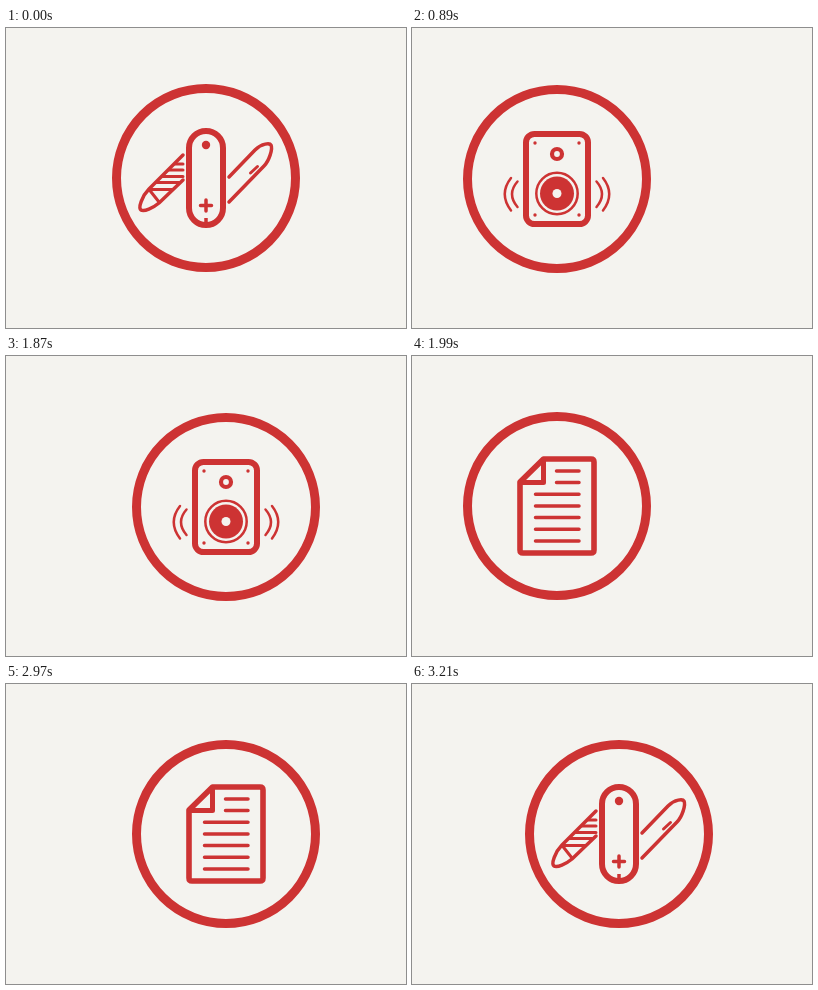
An HTML page that plays this animation: 400x300 px, repeating every 3.24 s.

```html
<!DOCTYPE html>
<html lang="en">
<head>
<meta charset="utf-8">
<title>Icon carousel</title>
<style>
  html, body { margin: 0; width: 100%; height: 100%; overflow: hidden; background: #f4f3ef; }
  svg { display: block; width: 100vw; height: 100vh; }
  .icon { fill: none; stroke: #cd3333; stroke-width: 3.5; stroke-linecap: round; stroke-linejoin: round; }
  .ring { stroke-width: 9; }
  .frame { stroke-width: 6; }
  .thin { stroke-width: 2.5; }
  .solid { fill: #cd3333; stroke: none; }
  .hole { fill: #f4f3ef; stroke: none; }
</style>
</head>
<body>
<svg viewBox="0 0 400 300">
  <!-- pocket knife -->
  <g class="icon">
    <circle class="ring" cx="200" cy="150" r="89.5"/>
    <rect class="frame" x="183" y="103" width="34" height="94" rx="17"/>
    <circle class="solid" cx="200" cy="117" r="4.2"/>
    <path d="M194.5 177.5H205.500M200 172V183"/>
    <path d="M200 190V196" stroke-linecap="butt"/>
    <path d="M177 127L143 161C136 168 132 180 135 182C138 184 147 180 153 175L177 152"/>
    <path d="M169 136H177M163 142H177M156 148.500H177M150 154.500H173M143.500 161.500H166M143.500 162L153 174" stroke-width="3"/>
    <path d="M223 149L249 122C256 115 264 115 265 117C267 121 263 133 258 138L223 174"/>
    <path d="M244.500 145L251.500 138.500" stroke-width="3"/>
  </g>

  <!-- loudspeaker -->
  <g class="icon">
    <circle class="ring" cx="200" cy="151" r="89.5"/>
    <rect class="frame" x="169" y="106" width="62" height="90" rx="8.500"/>
    <g class="solid">
      <circle cx="178" cy="115" r="1.7"/>
      <circle cx="222" cy="115" r="1.7"/>
      <circle cx="178" cy="187" r="1.7"/>
      <circle cx="222" cy="187" r="1.7"/>
      <circle cx="200" cy="165.5" r="17"/>
    </g>
    <circle cx="200" cy="126" r="5" stroke-width="4.2"/>
    <circle class="thin" cx="200" cy="165.5" r="20.7"/>
    <circle class="hole" cx="200" cy="165.5" r="4.5"/>
    <path class="thin" d="M160.500 153.500Q149.500 166 160.500 179M154 150Q141.500 166 154 182.500"/>
    <path class="thin" d="M239.500 153.500Q250.500 166 239.500 179M246 150Q258.500 166 246 182.500"/>
  </g>

  <!-- document -->
  <g class="icon">
    <circle class="ring" cx="200" cy="150" r="89.5"/>
    <path d="M186.500 103H234Q237 103 237 106V194Q237 197 234 197H166Q163 197 163 194V126Z" stroke-width="5.6"/>
    <path d="M186.500 104V126.500H164" stroke-width="5"/>
    <path d="M199.500 115H222M199.500 126.500H222M178.500 138.200H222M178.500 149.900H222M178.500 161.600H222M178.500 173.300H222M178.500 185H222"/>
  </g>
</svg>
<script>
  const LOOP = 3240, HOLD = 770, CYCLE = 1100, STEP = 30, WIDTH = 400;
  // Slide distance per step: eases in, overshoots, settles.
  const slide = [20, 68, 150, 255, 345, 398, 420, 418, 407, WIDTH];
  const icons = [...document.querySelectorAll("svg > .icon")];

  function place(icon, x) {
    icon.setAttribute("transform", `translate(${x} 0)`);
    icon.style.display = Math.abs(x) < 300 ? "" : "none";
  }

  function draw() {
    const t = performance.now() % LOOP;
    const turn = Math.floor((t - HOLD) / CYCLE);
    const step = Math.floor((t - HOLD - turn * CYCLE) / STEP);
    const x = turn < 0 ? WIDTH : slide[Math.min(step, slide.length - 1)];
    const leaving = (turn + 3) % 3;
    const arriving = (leaving + 1) % 3;
    icons.forEach((icon, i) => {
      place(icon, i === leaving ? x : i === arriving ? x - WIDTH : WIDTH);
    });
    requestAnimationFrame(draw);
  }
  draw();
</script>
</body>
</html>
```
